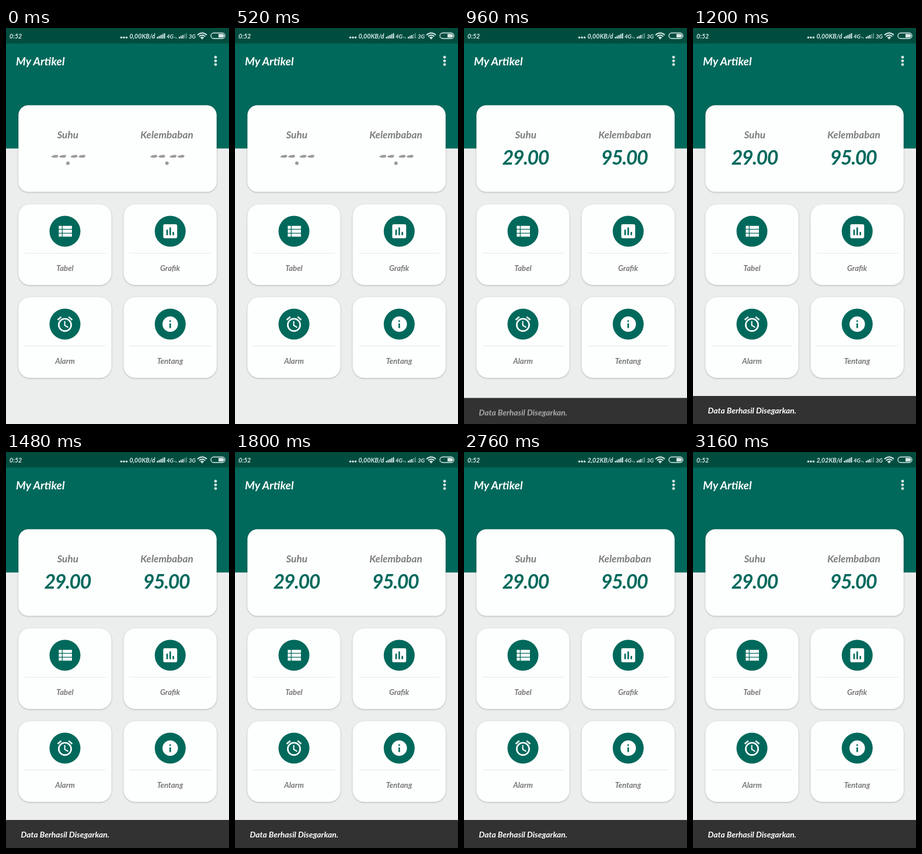
Animation of 382x678 px, one loop 3200 ms. Source, as an HTML page:

```html
<!DOCTYPE html>
<html lang="id">
<head>
<meta charset="utf-8">
<title>Suhu dan Kelembaban</title>
<style>
  html, body { margin: 0; width: 100%; height: 100%; overflow: hidden; background: #eceeed; }
  svg { display: block; width: 382px; height: 678px; }
  text { font-family: Lato, "Open Sans", sans-serif; font-style: italic; font-weight: 700; }

  .status { fill: #dcebe8; font-size: 10.6px; }
  .small { font-size: 9.6px; }
  .title { fill: #fff; font-size: 19.3px; }
  .card { fill: #fdfffe; filter: drop-shadow(0 1.5px 1.5px rgba(0, 0, 0, .24)); }
  .mid { text-anchor: middle; }
  .label { fill: #7c7c7c; font-size: 17.2px; }
  .name { fill: #777; font-size: 13.2px; }
  .value { fill: #00695c; font-size: 34px; letter-spacing: -1.5px; }
  .note { fill: #fff; font-size: 13.9px; }
  .green { fill: #00695c; }
  .white { fill: #fff; }

  /* one shared 3.2 s loop */
  .before, .after, .idle, .busy, .bar, .note { animation: 3.2s linear infinite; }
  .before { animation-name: hide-data; }
  .after { animation-name: show-data; }
  .idle { animation-name: hide-rate; }
  .busy { animation-name: show-rate; }
  .bar { animation-name: slide; }
  .note { animation-name: fade; }

  @keyframes hide-data { 0%, 24.99% { opacity: 1 } 25%, 100% { opacity: 0 } }
  @keyframes show-data { 0%, 24.99% { opacity: 0 } 25%, 100% { opacity: 1 } }
  @keyframes hide-rate { 0%, 66.24% { opacity: 1 } 66.25%, 100% { opacity: 0 } }
  @keyframes show-rate { 0%, 66.24% { opacity: 0 } 66.25%, 100% { opacity: 1 } }
  @keyframes slide {
    0% { transform: translateY(48px) }
    24.7% { transform: translateY(48px); animation-timing-function: cubic-bezier(.4, 0, .2, 1) }
    32.5%, 100% { transform: none }
  }
  @keyframes fade {
    0% { opacity: 0 }
    26.9% { opacity: 0; animation-timing-function: ease-in-out }
    32.5%, 100% { opacity: 1 }
  }
</style>
</head>
<body>
<svg viewBox="0 0 382 678">
  <defs>
    <g id="tile">
      <rect class="card" width="159.3" height="138" rx="20"/>
      <circle class="green" cx="79.7" cy="46" r="26.5"/>
      <path d="M10 83.5H149.5" stroke="#e6e8e7"/>
    </g>
    <g id="dashes" fill="#9b9b9b">
      <path id="dash" d="M-29 220.5Q-24 216.5 -17 217.5Q-16 220 -18 221.5Q-24 223 -29 220.5Z"/>
      <use href="#dash" x="13.5"/>
      <use href="#dash" x="33"/>
      <use href="#dash" x="46.5"/>
      <circle cy="231.5" r="3"/>
    </g>
    <path id="bars" d="M0 18v-3h2v3zM3 18v-4.5h2v4.5zM6 18v-6h2v6zM9 18v-7.5h2v7.5zM12 18v-9h2v9z"/>
  </defs>

  <rect width="382" height="678" fill="#eceeed"/>
  <rect class="green" width="382" height="206.3"/>
  <rect width="382" height="26.5" fill="#004d40"/>

  <!-- status bar -->
  <g class="status">
    <text x="6" y="17.5">0:52</text>
    <circle cx="197.5" cy="16.3" r="1.7"/>
    <circle cx="202" cy="16.3" r="1.7"/>
    <circle cx="206.5" cy="16.3" r="1.7"/>
    <text class="idle" x="255.5" y="17.5" text-anchor="end">0,00KB/d</text>
    <text class="busy" x="255.5" y="17.5" text-anchor="end">2,02KB/d</text>
    <use href="#bars" x="258.5"/>
    <text class="small" x="275" y="17.5">4G</text>
    <path d="M288 15h2l-1 3zM290.5 18h2l-1-3z" opacity=".7"/>
    <use href="#bars" x="296" opacity=".4"/>
    <path d="M296 18v-3h2v3zM299 18v-4.5h2v4.5zM302 18v-6h2v6z"/>
    <text class="small" x="313" y="17.5">3G</text>
    <g fill="none" stroke="#dcebe8" stroke-width="1.8">
      <path d="M328 12Q336 5 344 12M330.7 14.5Q336 10 341.3 14.5M333.3 17Q336 14.5 338.7 17"/>
      <rect x="351" y="8.5" width="24" height="9.5" rx="4.7" stroke-width="1.4"/>
    </g>
    <circle cx="336" cy="18" r="1.3"/>
    <path d="M364 10.3h6.5a2.95 2.95 0 0 1 0 5.900h-6.500z"/>
  </g>

  <!-- app bar -->
  <text class="title" x="17" y="64">My Artikel</text>
  <g fill="#d5e6e3">
    <circle cx="359" cy="50" r="2.4"/>
    <circle cx="359" cy="56.3" r="2.4"/>
    <circle cx="359" cy="62.6" r="2.4"/>
  </g>

  <!-- readings -->
  <rect class="card" x="21.3" y="132.3" width="339.5" height="148.2" rx="17"/>
  <g class="mid">
    <text class="label" x="105.7" y="189">Suhu</text>
    <text class="label" x="275.5" y="189">Kelembaban</text>
    <g class="after">
      <text class="value" x="105.3" y="234">29.00</text>
      <text class="value" x="274.5" y="234">95.00</text>
    </g>
  </g>
  <g class="before">
    <use href="#dashes" x="106"/>
    <use href="#dashes" x="275.7"/>
  </g>

  <!-- menu -->
  <use href="#tile" x="21.3" y="302"/>
  <use href="#tile" x="201.6" y="302"/>
  <use href="#tile" x="21.3" y="461"/>
  <use href="#tile" x="201.6" y="461"/>
  <g class="name mid">
    <text x="101" y="415.5">Tabel</text>
    <text x="281" y="415.5">Grafik</text>
    <text x="101" y="574.5">Alarm</text>
    <text x="281" y="574.5">Tentang</text>
  </g>

  <!-- icons on a 24 unit grid -->
  <g class="white" transform="translate(85.1 332.1) scale(1.325)">
    <path d="M4 5h4v4H4zM9 5h12v4H9zM4 10h4v4H4zM9 10h12v4H9zM4 15h4v4H4zM9 15h12v4H9z"/>
  </g>
  <g transform="translate(265.4 332.1) scale(1.325)">
    <rect class="white" x="3" y="3" width="18" height="18" rx="2"/>
    <path class="green" d="M7 10h2v7H7zM11 7h2v10h-2zM15 13h2v4h-2z"/>
  </g>
  <g fill="none" stroke="#fff" stroke-width="2" transform="translate(85.1 491.1) scale(1.325)">
    <circle cx="12" cy="13" r="8"/>
    <path d="M2.65 6.47L7.24 2.62M21.35 6.48L16.75 2.62"/>
    <path d="M11.75 8v5.6l4.4 2.63" stroke-width="1.5"/>
  </g>
  <g transform="translate(265.4 491.1) scale(1.325)">
    <circle class="white" cx="12" cy="12" r="10"/>
    <path class="green" d="M11 7h2v2h-2zM11 11h2v6h-2z"/>
  </g>

  <!-- snackbar -->
  <g class="bar">
    <rect y="630" width="382" height="48" fill="#313231"/>
    <text class="note" x="25.5" y="659.5">Data Berhasil Disegarkan.</text>
  </g>
</svg>
</body>
</html>
```
